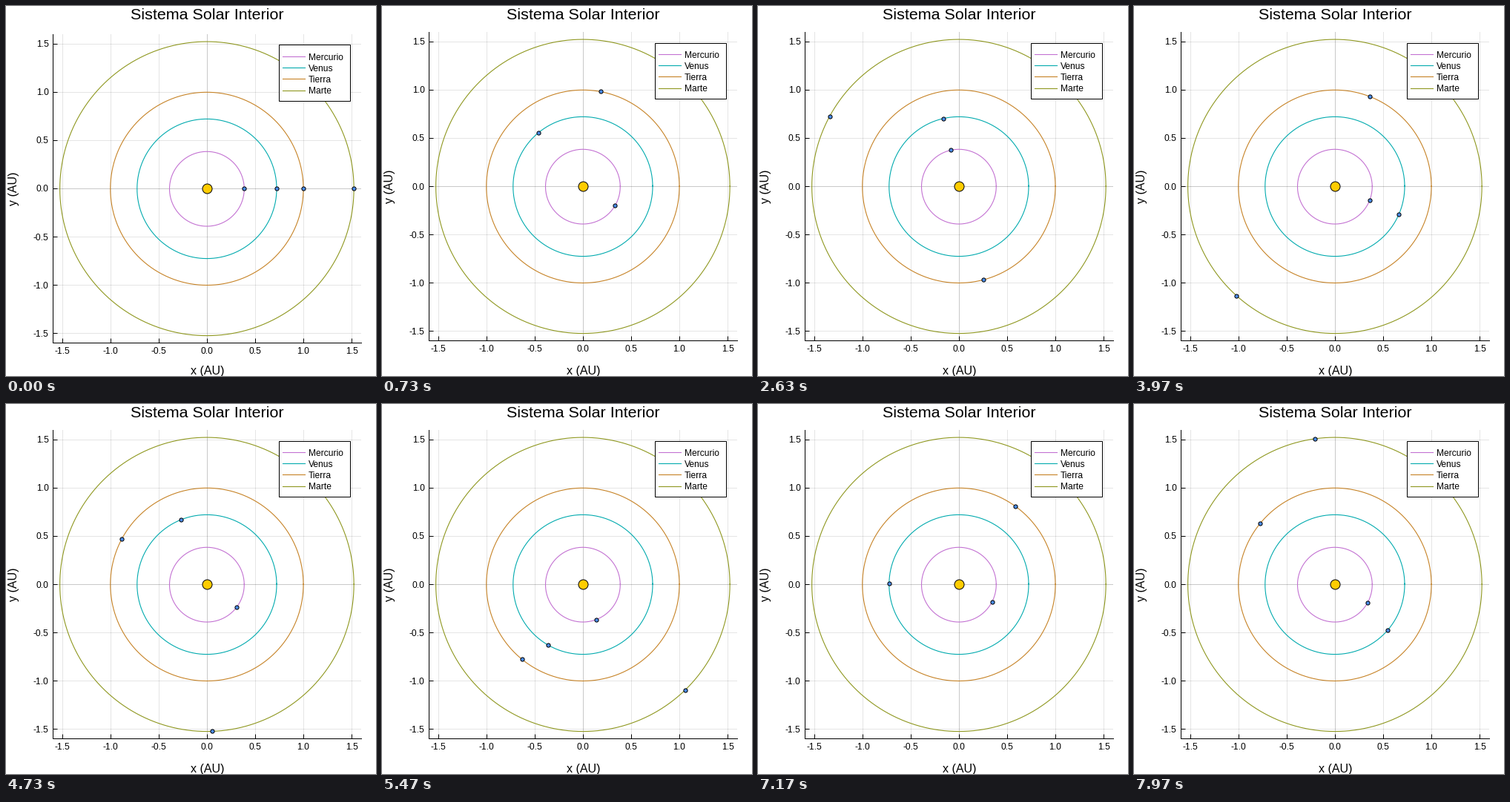
Animation of 499 by 499 pixels, one loop 8000 ms. Source, as a matplotlib script:

```python
import numpy as np
import matplotlib.pyplot as plt
from matplotlib.animation import FuncAnimation
from matplotlib.patches import Rectangle

SIZE, DPI = 499, 100
PX = 72 / DPI                      # points per pixel
TICK, LOOP = 20, 8000              # ms
POSES = 240                        # planet positions per loop
SUBSTEPS, DT = 10, 0.001           # years
GM = 4 * np.pi ** 2
LEFT, SIDE = 62.7, 416.4
TOP_START, TOP = 37.8, 34.8        # the plot area sits lower at the very start

PLANETS = [
    ("Mercurio", 0.3871, "#c371d2"),
    ("Venus", 0.7233, "#00aaae"),
    ("Tierra", 1.0, "#c68225"),
    ("Marte", 1.5237, "#8e971e"),
]

plt.rcParams["font.family"] = "Liberation Sans"


def simulate(steps):
    """Semi-implicit Euler orbits, shape (steps + 1, planets, 2)."""
    a = np.array([p[1] for p in PLANETS])
    pos = np.column_stack([a, 0 * a])
    vel = np.column_stack([0 * a, np.sqrt(GM / a)])
    track = [pos]
    for _ in range(steps):
        r = np.linalg.norm(pos, axis=1, keepdims=True)
        vel = vel - DT * GM * pos / r ** 3
        pos = pos + DT * vel
        track.append(pos)
    return np.array(track)


def box(top):
    return [LEFT / SIZE, 1 - (top + SIDE) / SIZE, SIDE / SIZE, SIDE / SIZE]


def in_axes(x, y):
    """Pixel offset from the plot's top left corner, as axes fractions."""
    return x / SIDE, 1 - y / SIDE


track = simulate(POSES * SUBSTEPS)

fig = plt.figure(figsize=(SIZE / DPI, SIZE / DPI), dpi=DPI, facecolor="white")
ax = fig.add_axes(box(TOP_START), xlim=(-1.6, 1.6), ylim=(-1.6, 1.6))

ticks = np.arange(-1.5, 1.6, 0.5)
labels = [f"{t:.1f}" for t in ticks]
ax.set_xticks(ticks, labels)
ax.set_yticks(ticks, labels)
ax.tick_params(direction="in", length=6 * PX, width=PX, labelsize=12 * PX)
ax.tick_params(axis="x", pad=6.2 * PX)
ax.tick_params(axis="y", pad=5 * PX)
ax.set_axisbelow(True)
ax.grid(color="black", alpha=0.1, linewidth=PX)
for side in ("top", "right"):
    ax.spines[side].set_visible(False)
for side in ("left", "bottom"):
    ax.spines[side].set_linewidth(PX)
ax.axhline(0, color="black", alpha=0.12, lw=PX, zorder=0.6)
ax.axvline(0, color="black", alpha=0.12, lw=PX, zorder=0.6)

fig.text(271.3 / SIZE, 1 - 18.3 / SIZE, "Sistema Solar Interior",
         size=21.5 * PX, ha="center", va="baseline")
fig.text(271.5 / SIZE, 1 - 497 / SIZE, "x (AU)",
         size=16 * PX, ha="center", va="baseline")
ax.text(*in_axes(18 - LEFT, SIDE / 2), "y (AU)", size=16 * PX, rotation=90,
        ha="right", va="center", transform=ax.transAxes)

for i, (_, a, color) in enumerate(PLANETS):
    period = int(np.ceil(a ** 1.5 / DT)) + 1
    ax.plot(*track[:period, i].T, color=color, lw=1.1 * PX, zorder=2)

ax.plot(0, 0, "o", ms=13 * PX, mfc="#ffcc00", mec="black", mew=PX, zorder=3)
dots, = ax.plot([], [], "o", ms=5.2 * PX, mfc="#4a8cea", mec="black",
                mew=PX, zorder=4)

# Legend
ax.add_patch(Rectangle(in_axes(305, 90.2), 96.5 / SIDE, 75.5 / SIDE,
                       transform=ax.transAxes, fc="white", ec="black",
                       lw=PX, zorder=5))
for i, (name, _, color) in enumerate(PLANETS):
    y = 30.2 + 15.2 * i
    x0, fy = in_axes(310.3, y)
    x1, _ = in_axes(340.3, y)
    ax.plot([x0, x1], [fy, fy], color=color, lw=1.1 * PX,
            transform=ax.transAxes, zorder=6)
    ax.text(*in_axes(345.3, y + 4.8), name, size=12 * PX, va="baseline",
            transform=ax.transAxes, zorder=6)


def update(n):
    # pose changes are rounded to hundredths of a second
    k = int((n * TICK + 15) * POSES // LOOP)
    ax.set_position(box(TOP if k else TOP_START))
    dots.set_data(*track[k * SUBSTEPS].T)
    return dots,


anim = FuncAnimation(fig, update, frames=LOOP // TICK, interval=TICK,
                     init_func=lambda: update(0), repeat=True, repeat_delay=0)
plt.show()
```
